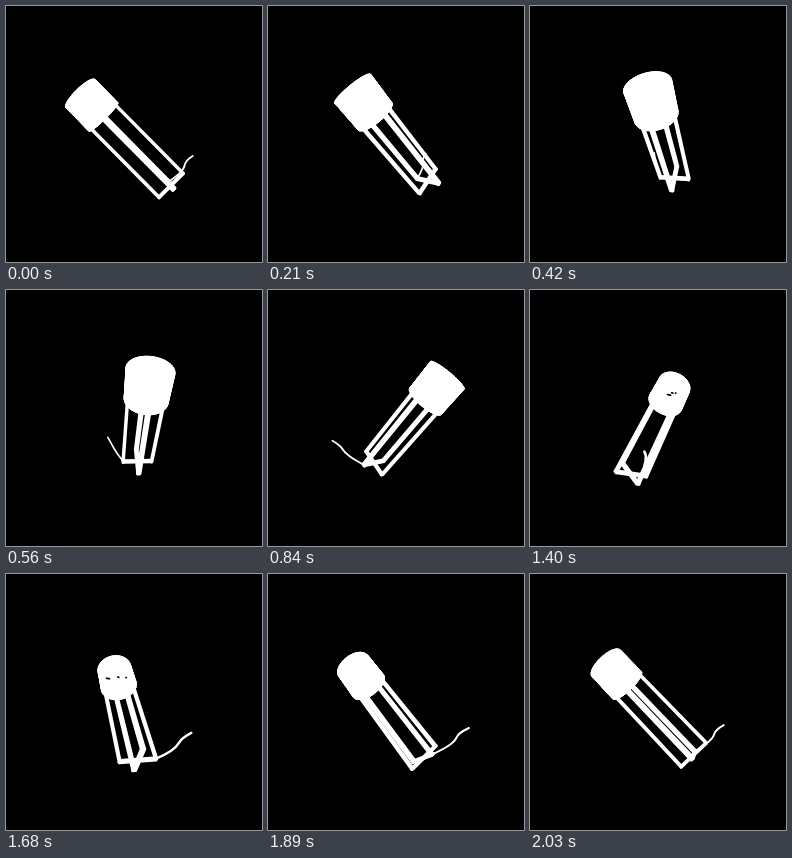
An HTML page with a canvas for the animation above (2100 ms loop, 256 px wide and 256 px high).

```html
<!DOCTYPE html>
<html lang="en">
<head>
<meta charset="utf-8">
<title>Spinning lamp</title>
<style>
  html, body { margin: 0; width: 100%; height: 100%; overflow: hidden; background: #000; }
  canvas { display: block; width: 100vw; height: 100vh; }
</style>
</head>
<body>
<canvas id="stage" width="256" height="256"></canvas>
<script>
const ctx = document.getElementById('stage').getContext('2d');
const STEP = 70, STEPS = 30, TAU = Math.PI * 2;
const TILT = Math.SQRT1_2;          // the body leans 45 degrees
const DIST = 248, CENTRE = 128;     // camera distance, vanishing point
const SIDE = -8;                    // sideways offset of the body from the spin axis
const CAP_R = 20.2, LEG_R = 17, WIRE_W = 2;
const STRIP = 1.2, STRIP_EDGE = 3.3; // half breadth and thickness of the flat legs

// Stations along the leaning axis: [reach, height]
const TOP = [-53.2, -40], RIM = [-30.5, -17], FOOT = [37, 51.3];
// Loose wire: [reach, side, height]
const WIRE = [[37, 9, 51], [46, 13.5, 46], [56, 19.5, 38], [58, 23.5, 30], [67, 27, 25]];

let cos = 1, sin = 0;

// Turn about the vertical axis, then project with perspective.
function project([reach, side, height]) {
  const z = reach * sin + side * cos - SIDE;
  const s = DIST / (DIST + z);
  return {
    x: CENTRE + s * (reach * cos - side * sin),
    y: CENTRE + s * height,
    s
  };
}

// Point on the cross-section at a station: u sideways, v upwards.
const around = ([reach, height], u, v) =>
  [reach + v * TILT, SIDE + u, height - v * TILT];

function fillShape(points) {
  ctx.beginPath();
  points.forEach(p => ctx.lineTo(p.x, p.y));
  ctx.closePath();
  ctx.fill();
  ctx.stroke();
}

function ring(station) {
  const n = 40;
  return Array.from({ length: n }, (_, i) => {
    const a = TAU * i / n;
    return project(around(station, CAP_R * Math.cos(a), CAP_R * Math.sin(a)));
  });
}

function drawCap() {
  const top = ring(TOP), rim = ring(RIM);
  ctx.lineWidth = 1;
  fillShape(top);
  fillShape(rim);
  top.forEach((p, i) => {
    const j = (i + 1) % top.length;
    fillShape([p, top[j], rim[j], rim[i]]);
  });
}

// Two crossed U-shaped flat strips, each broad across its own plane.
function drawLegs() {
  for (const [du, dv] of [[1, 0], [0, 1]]) {
    const edges = (station, r) => [-STRIP, STRIP].map(w =>
      project(around(station, du * r + dv * w, dv * r + du * w)));
    const bends = [[RIM, -LEG_R], [FOOT, -LEG_R], [FOOT, LEG_R], [RIM, LEG_R]]
      .map(([station, r]) => edges(station, r));
    for (let i = 0; i < 3; i++) {
      const [a, b] = bends[i], [c, d] = bends[i + 1];
      ctx.lineWidth = STRIP_EDGE * (a.s + c.s) / 2;
      fillShape([a, b, d, c]);
    }
  }
}

function drawWire() {
  const pts = WIRE.map(project);
  const last = pts[pts.length - 1];
  ctx.lineWidth = WIRE_W * pts[2].s;
  ctx.beginPath();
  ctx.moveTo(pts[0].x, pts[0].y);
  for (let i = 1; i < pts.length - 1; i++) {
    const p = pts[i], q = pts[i + 1];
    const end = i === pts.length - 2 ? last : { x: (p.x + q.x) / 2, y: (p.y + q.y) / 2 };
    ctx.quadraticCurveTo(p.x, p.y, end.x, end.y);
  }
  ctx.stroke();
}

// Small dark gaps under the cap, seen only while its open end faces forward.
function drawGaps(deg) {
  if (deg < 228 || deg > 300) return;
  const mid = -0.019 * (deg - 276);
  const spread = 0.22 + 0.28 * (deg - 240) / 48;
  ctx.fillStyle = '#000';
  [[-1, 0.6, 2.6], [0.1, 0.72, 1.5], [1, 0.7, 1]].forEach(([k, v, w]) => {
    const p = project(around(RIM, CAP_R * (mid + k * spread), CAP_R * v));
    ctx.beginPath();
    ctx.ellipse(p.x, p.y, w, 0.9, 0.2, 0, TAU);
    ctx.fill();
  });
}

function draw(now) {
  const step = Math.floor(now / STEP) % STEPS;
  const angle = TAU * step / STEPS;
  cos = Math.cos(angle);
  sin = Math.sin(angle);

  ctx.fillStyle = '#000';
  ctx.fillRect(0, 0, 256, 256);
  ctx.fillStyle = ctx.strokeStyle = '#fff';
  ctx.lineCap = ctx.lineJoin = 'round';
  drawWire();
  drawLegs();
  drawCap();
  drawGaps(step * 360 / STEPS);
}

const start = performance.now();
function tick() {
  draw(performance.now() - start);
  requestAnimationFrame(tick);
}
tick();
</script>
</body>
</html>
```
